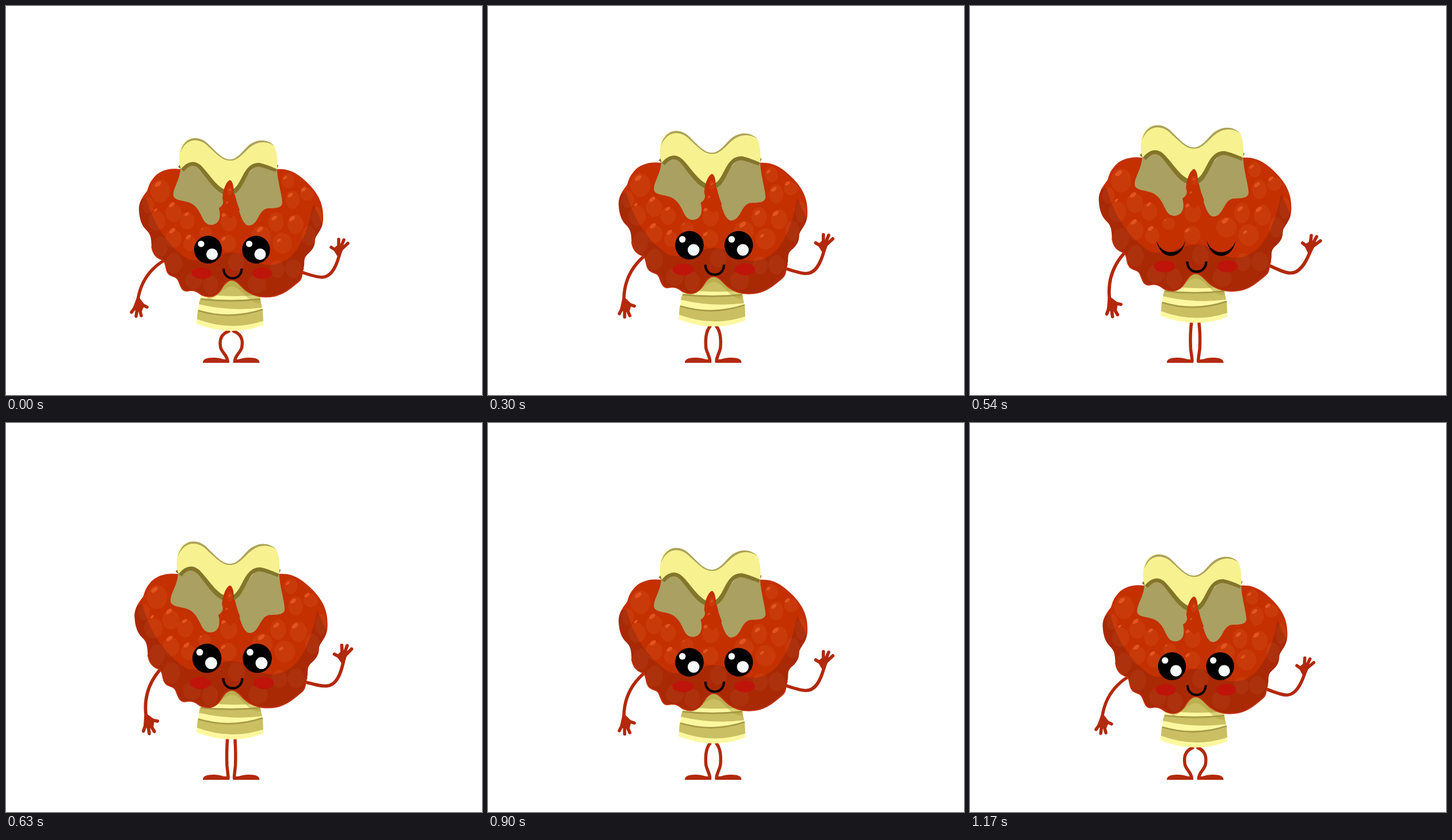
These frames come from a looping animation (827 px wide and 677 px high, 1200 ms). An HTML page:

```html
<!DOCTYPE html>
<html lang="en">
<head>
<meta charset="utf-8">
<title>Waving berry</title>
<style>
  html, body { margin: 0; width: 100%; height: 100%; overflow: hidden; background: #fff; }
  svg { display: block; width: 827px; height: 677px; }
  .limb { fill: none; stroke: #b2290c; stroke-width: 5.5; stroke-linecap: round; }
  .skin { fill: #b2290c; }
</style>
</head>
<body>
<svg viewBox="0 0 827 677">
  <defs>
    <path id="bulb" d="M303 284C280 281 263 289 255 301C248 309 247 318 245 322C236 333 230 344 231 356C232 372 236 382 243 389
      C253 398 252 407 253 418C255 431 260 438 272 442C279 446 276 456 281 464C286 473 296 468 300 479C304 489 306 497 315 496
      C329 493 334 499 340 503C354 509 366 506 375 491C381 481 387 477 392 477C402 477 408 489 418 496C432 506 450 508 466 505
      C485 501 498 488 508 480C516 474 513 465 517 456C520 448 515 440 524 432C533 424 537 418 537 406C540 395 552 389 551 366
      C551 342 541 326 527 311C510 294 494 282 471 284L440 300H330Z"/>
    <path id="closed" d="M327 422C333 456 369 456 375 422C367 448 335 448 327 422Z"/>
    <g id="eye">
      <circle cx="351" cy="424" r="24.2"/>
      <circle cx="339" cy="414" r="5.6" fill="#f6faf8"/>
      <circle cx="358" cy="432" r="10" fill="#f6faf8"/>
    </g>
    <g id="leg">
      <path class="limb" id="shin"/>
      <path class="skin" d="M342 621C342 613 352 612 362 612C373 612 376 616 387 615L388 621Z"/>
    </g>
    <clipPath id="inBulb"><use href="#bulb"/></clipPath>
  </defs>

  <use href="#leg"/>
  <use href="#leg" transform="translate(782.5) scale(-1 1)"/>

  <g id="stalk">
    <path d="M343 470H438L447 555Q392 577 331 553Q333 525 340 500Z" fill="#fdf89f"/>
    <path d="M343 470H438L441 503Q390 508 340 501Z" fill="#cabf62"/>
    <path d="M337 511Q390 517 442 511L445 525Q390 532 335 519Z" fill="#cabf62"/>
    <path d="M333 530Q390 547 446 528L447 548Q390 567 332 545Z" fill="#cabf62"/>
    <path d="M338 510Q390 516 442 510M334 530Q390 547 446 528" fill="none" stroke="#a69a48" stroke-width="2.8"/>
    <path d="M345 470H438L442 517C418 518 412 490 392 488C376 489 368 509 350 511Z" fill="#a49636" opacity=".4"/>
  </g>

  <g id="body">
    <g id="leftArm">
      <path class="limb" d="M274 443C247 460 233 485 229 512"/>
      <path class="limb" d="M229 518L218 533M229 520L226 540M230 520L235 539M231 517L245 524" stroke-width="5"/>
      <path class="skin" d="M227 508L219 529L236 531L241 520L232 508Z"/>
    </g>
    <g id="rightArm">
      <path class="limb" d="M510 462C530 469 540 472 549 472C566 472 574 452 579 434"/>
      <path class="limb" d="M578 424L578 406M580 424L587 407M581 425L594 413M578 428L565 420"/>
      <path class="skin" d="M576 436L568 423L576 416L588 417L581 436Z"/>
    </g>

    <use href="#bulb" fill="#c43000"/>
    <g clip-path="url(#inBulb)">
      <g id="cells" fill="#c93a0a"></g>
      <path d="M244 334C254 376 280 418 317 441Q340 446 360 437Q392 421 424 437Q441 453 465 450C510 444 526 384 534 345L560 400V520H220V340Z"
        fill="#5a1414" opacity=".25"/>
      <g id="glints" fill="#e2541f"></g>
    </g>
    <path d="M253 418C255 431 260 438 272 442C279 446 276 456 281 464C286 473 296 468 300 479C304 489 306 497 315 496C329 493 334 499 340 503C354 509 366 506 375 491C381 481 387 477 392 477C402 477 408 489 418 496C432 506 450 508 466 505C485 501 498 488 508 480C516 474 513 465 517 456"
      fill="none" stroke="#c43210" stroke-width="1.8"/>

    <path d="M303 285C301 306 289 318 291 331C296 342 317 336 329 349C342 362 341 381 357 381C371 380 374 367 370 352C382 344 376 336 377 320L345 280L322 272Z" fill="#aaa061"/>
    <path d="M396 322C403 347 409 384 423 382C440 380 438 351 458 352C472 352 480 350 480 342C479 326 472 306 471 285L437 273Z" fill="#aaa061"/>
    <path d="M304 284C314 271 328 266 341 280C357 299 370 323 388 323C411 321 409 272 440 273Q451 275 471 283" fill="none" stroke="#83762a" stroke-width="13"/>
    <path d="M303 250C310 225 337 224 353 242C367 256 377 267 389 267C405 267 415 245 427 239C441 231 455 233 466 243Q473 258 471 284Q451 275 440 273C409 272 411 319 388 321C370 321 357 297 341 280C328 266 314 271 304 284Q298 268 303 250Z" fill="#f7f28f"/>
    <path d="M303 255C310 225 337 224 353 242C367 256 377 267 389 267C405 267 415 245 427 239C441 231 455 233 466 243C453 235 440 235 428 243C415 251 405 270 389 269C377 269 367 259 352 245C337 229 313 228 303 255Z" fill="#aca25c"/>
    <path d="M370 352C380 347 378 342 376 335C377 319 383 305 389 303C395 304 396 319 396 328L406 355L390 370Z" fill="#c43000"/>
    <ellipse cx="389" cy="322" rx="5" ry="8" fill="#c93a0a"/>
    <g fill="#e2541f">
      <ellipse cx="389" cy="320" rx="2.5" ry="1.4" transform="rotate(-40 389 320)"/>
      <ellipse cx="384" cy="342" rx="2.5" ry="1.4" transform="rotate(-40 384 342)"/>
    </g>

    <g fill="#bf140a">
      <ellipse cx="340" cy="465" rx="17.5" ry="10"/>
      <ellipse cx="445" cy="465" rx="17" ry="10"/>
    </g>
    <path d="M378 457C378 479.500 409.500 479.500 409.500 457" fill="none" stroke="#000" stroke-width="4"/>
    <g id="open"><use href="#eye"/><use href="#eye" x="83.500"/></g>
    <g id="shut"><use href="#closed"/><use href="#closed" x="83.500"/></g>
  </g>
</svg>
<script>
const LOOP = 1200, STEP = 30, BLINK = [480, 600];
const $ = id => document.getElementById(id);

// x, y, rx, ry
const cells = [
  [268, 322, 17, 20], [291, 360, 14, 16], [315, 374, 13, 15], [291, 405, 14, 16], [320, 414, 12, 13],
  [347, 394, 11, 10], [387, 376, 14, 16], [386, 413, 14, 15], [443, 400, 17, 17], [469, 376, 13, 17],
  [503, 380, 14, 17], [480, 413, 17, 18], [498, 337, 12, 16], [523, 328, 12, 11], [490, 304, 11, 13],
  [262, 374, 15, 17], [268, 419, 13, 18], [292, 448, 14, 18], [326, 478, 15, 15], [356, 486, 13, 17],
  [400, 446, 14, 16], [436, 484, 16, 16], [471, 458, 13, 15], [499, 457, 14, 16], [526, 400, 12, 17],
  [540, 368, 9, 18], [247, 347, 10, 14]
];
// x, y, size
const glints = [
  [264, 310, 6.5], [260, 355, 3.5], [288, 346, 6], [289, 391, 6], [314, 362, 4.5], [317, 402, 5.5],
  [341, 388, 2], [379, 363, 5], [378, 405, 4.5], [441, 389, 6.5], [466, 369, 5.5], [497, 370, 6],
  [474, 408, 4], [494, 329, 5.5], [517, 319, 5], [485, 299, 4]
];
const ellipse = (x, y, rx, ry, turn) =>
  `<ellipse cx="${x}" cy="${y}" rx="${rx}" ry="${ry}" transform="rotate(${turn} ${x} ${y})"/>`;
$('cells').innerHTML = cells.map(c => ellipse(...c, 0)).join('');
$('glints').innerHTML = glints.map(([x, y, r]) => ellipse(x, y, r, r * .55, -38)).join('');

const bentLeg = [387, 566, 368, 573, 372, 590, 373, 595, 376, 604, 385, 609, 385, 618];
const straightLeg = [384.5, 549, 384.5, 565, 384, 585, 384.5, 596, 385, 604, 386, 612, 386, 618];

// Triangle wave from 0 up to 1 and back
const triangle = phase => 1 - Math.abs(1 - 2 * (((phase % 1) + 1) % 1));

function draw(t) {
  const rise = triangle(t / LOOP);
  const wave = 2 * triangle(t / 600 + .25) - 1;
  const p = bentLeg.map((v, i) => v + (straightLeg[i] - v) * rise);
  $('shin').setAttribute('d', `M${p.slice(0, 2)}C${p.slice(2)}`);
  $('stalk').setAttribute('transform', `translate(0 ${-15.5 * rise})`);
  $('body').setAttribute('transform', `translate(391 730) scale(${1 + .05 * rise}) translate(-391 -730)`);
  $('leftArm').setAttribute('transform', `rotate(${-17.5 * rise} 272 444)`);
  $('rightArm').setAttribute('transform', `rotate(${-16.5 * wave} 514 464)`);
  const shut = t >= BLINK[0] && t < BLINK[1];
  $('open').style.display = shut ? 'none' : '';
  $('shut').style.display = shut ? '' : 'none';
}

function tick() {
  draw(Math.floor(performance.now() % LOOP / STEP) * STEP);
  requestAnimationFrame(tick);
}
tick();
</script>
</body>
</html>
```
